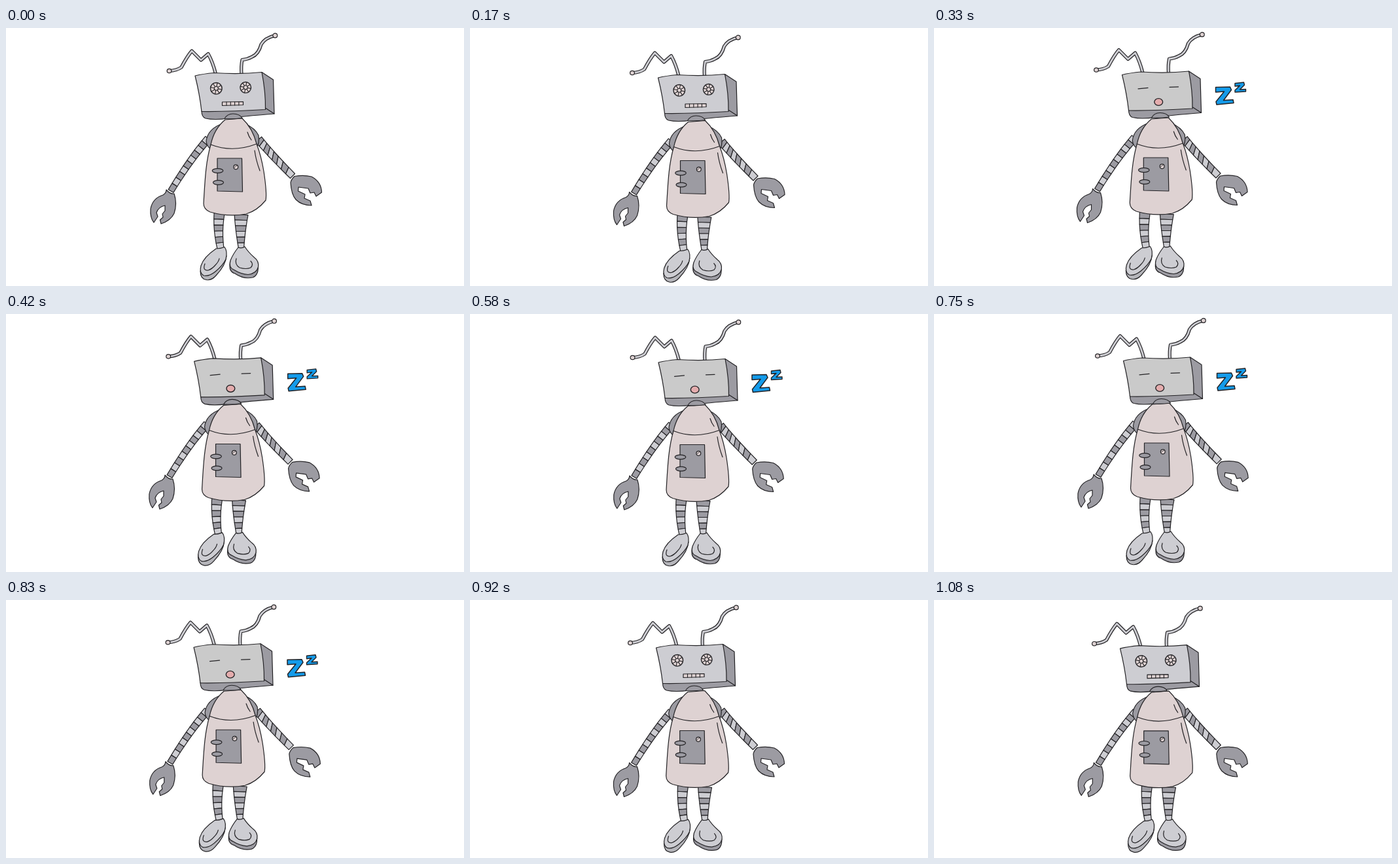
These frames come from a looping animation (700 px wide and 394 px high, 1.16 s). An HTML page with a canvas:

```html
<!DOCTYPE html>
<html lang="en">
<head>
<meta charset="utf-8">
<title>Sleepy robot</title>
<style>
html, body { margin: 0; height: 100%; overflow: hidden; background: #fff; }
canvas { display: block; }
</style>
</head>
<body>
<canvas id="stage" width="700" height="394"></canvas>
<script>
const ctx = document.getElementById('stage').getContext('2d');
const INK = '#242326', DARK = '#9c9ba2', LIGHT = '#cdcdd2', PINK = '#ded2d2', BLUE = '#149bea';
const LOOP = 1160, STEPS = 14;
// Twelve drawings per second, timed to hundredths of a second.
const starts = Array.from({ length: STEPS }, (_, i) => Math.round(i * 25 / 3) * 10);

// Drift of each part at the key steps, as [x, y].
const keys = [0, 2, 4, 7, 9, 11, 13, 14];
const drift = {
  head: [[0, 0], [-1.5, 3], [-1.5, -1.5], [-1, 1], [.5, -1.5], [-4.5, 0], [-4.5, 1.2], [0, 0]],
  body: [[0, 0], [-1.5, 3.5], [-2.7, -1], [-2, .5], [-1.5, -2], [-2.3, .5], [-2.3, .8], [0, 0]],
  left: [[0, 0], [-1.5, 3.5], [-2.5, -1.5], [-1.2, 0], [-1, -2], [-1.5, 1.5], [-.7, 1.5], [0, 0]],
  right: [[0, 0], [-1.5, 3.5], [-3.5, -.5], [-3.3, .5], [-2.3, -.7], [-2, -1], [-3.2, -1], [0, 0]],
  legs: [[0, 0], [-1.2, 3.5], [-3.7, -1], [-3, 0], [-3, -2], [-.5, .7], [-.5, .7], [0, 0]]
};

function offset(part, step) {
  const k = keys.findLastIndex(v => v <= step);
  const f = (step - keys[k]) / (keys[k + 1] - keys[k]);
  const [a, b] = [drift[part][k], drift[part][k + 1]];
  return a.map((v, i) => v + (b[i] - v) * f);
}

function shape(d, fill, width = 1.2) {
  const path = new Path2D(d);
  if (fill) { ctx.fillStyle = fill; ctx.fill(path); }
  ctx.strokeStyle = INK;
  ctx.lineWidth = width;
  ctx.stroke(path);
}

const line = (d, width) => shape(d, null, width);

function oval(x, y, rx, ry, fill, width = 1.2) {
  const p = new Path2D();
  p.ellipse(x, y, rx, ry, 0, 0, 7);
  shape(p, fill, width);
}

function tube(d) {
  const path = new Path2D(d);
  for (const [color, width] of [[INK, 5.2], [LIGHT, 2.8]]) {
    ctx.strokeStyle = color;
    ctx.lineWidth = width;
    ctx.stroke(path);
  }
}

// Striped limb along a quadratic curve; skew slants the stripes.
function limb([x0, y0, cx, cy, x1, y1], w0, w1, count, skew, first = 0) {
  const edge = (t, side) => {
    const u = t + side * skew * t * (1 - t) * 4;
    const mix = (a, c, b) => a * (1 - u) ** 2 + 2 * c * u * (1 - u) + b * u * u;
    const slope = (a, c, b) => (c - a) * (1 - u) + (b - c) * u;
    const dx = slope(x0, cx, x1), dy = slope(y0, cy, y1);
    const r = side * (w0 + (w1 - w0) * u) / 2 / Math.hypot(dx, dy);
    return [mix(x0, cx, x1) - dy * r, mix(y0, cy, y1) + dx * r];
  };
  for (let i = 0; i < count; i++) {
    const a = i / count, b = (i + 1) / count;
    const corners = [edge(a, -1), edge(b, -1), edge(b, 1), edge(a, 1)];
    shape('M' + corners.join('L') + 'Z', (i + first) % 2 ? DARK : LIGHT);
  }
}

function legs() {
  limb([326, 283, 323, 310, 328, 337], 16, 10, 6, 0, 1);
  limb([359.5, 285, 358, 310, 359.5, 337], 21, 8, 6, 0, 1);
  shape('M297 371Q297 383 306 384.5Q314 386 321 378Q336 362 337 348L322 352Z', '#b5b5ba');
  shape('M321 337Q328 337 334 334.5Q339 341 336 353Q332 362 320 372Q310 380 302 378Q295 374 298 363Q302 350 321 337Z', LIGHT);
  line('M304 360Q300 371 309 370Q315 368 320 362Q325 357 326 352');
  shape('M342.5 359Q340 372 350 375Q363 384 377 381Q387 377 385 361Z', DARK);
  shape('M355 335Q360 337 365 334Q370 342 379 350Q387 356 385.5 365Q383 375 370 376.5Q359 376 348 369Q340 366 343 355Q347 345 355 335Z', LIGHT);
  line('M352 352Q349 361 357 366Q367 369 374 366Q379 361 374 356');
}

function leftArm() {
  limb([309, 169, 281, 201, 252, 249], 11, 9, 10, 0);
  shape('M245 247Q251 254 257 253Q262 268 257 283Q252 294 237 299L235.500 293L240 289L239 284L243 279L243 271Q233 273 230 282L232 288L226 297Q220 290 221 276Q224 260 240 255Q245 252 245 247Z', DARK);
}

function rightArm() {
  limb([386, 170, 404, 192, 438, 226], 12, 10, 8, .05, 1);
  shape('M435 236Q436 231 441 226.500Q455 224 467 227Q482 235 482.500 251L474 257L471 251L465 252L462 245L447 243L446.500 249L457 254L456 260L465 264L467 271Q452 271 443 262Q436 254 435 236Z', DARK);
}

function body() {
  shape('M331 146Q308 154 306 173Q307 181 313 185L326 165Z', DARK);
  shape('M365 146Q381 153 386 164Q388 177 382 184L368 165Z', DARK);
  shape('M335 140Q318 154 313 178C305 205 304 235 302 268Q302 277 312 281Q340 289 367 284Q384 279 397 263Q399 252 394 219Q390 195 383 177Q377 153 361 138Z', PINK);
  line('M313 178Q346 191 383 177');
  line('M369 159Q371 166 375 171');
  line('M380 187Q382 202 388 218');
  shape('M323 199L360.500 199L361.500 250L323 249Z', DARK);
  oval(351.3, 212.3, 3.4, 3.5, PINK);
  line('M349 213L353 210', .8);
  oval(323.5, 218, 8.3, 3.3, DARK);
  oval(324.5, 236, 8, 3.3, DARK);
}

function eye(x, y, r) {
  oval(x, y, r, r, PINK, 1.4);
  for (let i = 0; i < 8; i++) {
    const a = i * Math.PI / 4 + .2, c = Math.cos(a), s = Math.sin(a);
    line(`M${x + c * 3} ${y + s * 3}L${x + c * r} ${y + s * r}`, 1.1);
  }
  oval(x, y, 3, 3, PINK, 1.1);
}

function awakeFace() {
  eye(321.3, 92.3, 8.8);
  eye(366.2, 90.8, 8.3);
  shape('M330.500 113L362.500 112.500L362.500 117.500L330.500 118.500Z', PINK);
  for (let x = 337; x < 362; x += 6.3) line(`M${x} 113L${x} 118`, 1.1);
}

function asleepFace() {
  line('M313.500 94.300L328.500 92.800');
  line('M361.500 91.800L375 91.300');
  oval(344.7, 114.5, 6.4, 5.4, '#e4acad', 1.4);
  shape('M432 92L454 91.500L456 96L444 112L458.500 111L459.500 116L433.500 118.500L432.500 114L445 98.500L432 99.500Z', BLUE, 1.5);
  shape('M461.500 86L475 84.500L476 88.500L469 95.500L478 95L478 98.500L461.500 99.500L461.500 96.500L469 89.500L461.500 90.500Z', BLUE, 1.4);
}

function head(asleep) {
  tube('M249 65.500Q261 65 268 60Q277 43 284 35L298 49L309 39.500Q316 52 320.500 70');
  tube('M411 11.500Q396 15 390 25Q386 40 376 44Q369 48 361 48.500Q359 58 360 71');
  oval(249.5, 65.5, 3.4, 3.2, PINK);
  oval(411.3, 11.5, 3.4, 3.4, PINK);
  shape('M391 67.500L408.500 79L410 131L396 123Z', DARK);
  shape('M299 126.500L397 122.500L410 131Q360 135 340 138Q318 141 305 138Q299 136 299 126.500Z', DARK);
  shape('M289 73Q301 70 318 68.500Q358 71 391 67.500Q397 98 396.500 124.500Q340 128 299 127.500Q296 101 289 73Z', asleep ? '#cacaca' : LIGHT);
  shape('M334 138.500Q338 131 347 131Q357 131 361 137.500Q347 139.500 334 138.500Z', DARK);
  (asleep ? asleepFace : awakeFace)();
}

function frame() {
  const t = performance.now() % LOOP;
  const step = starts.findLastIndex(s => s <= t);
  const asleep = step >= 4 && step < 11;
  const place = (part, draw) => {
    ctx.save();
    ctx.translate(...offset(part, step));
    draw(asleep);
    ctx.restore();
  };
  ctx.clearRect(0, 0, 700, 394);
  ctx.lineJoin = ctx.lineCap = 'round';
  place('legs', legs);
  place('left', leftArm);
  place('right', rightArm);
  place('body', body);
  place('head', head);
  requestAnimationFrame(frame);
}
frame();
</script>
</body>
</html>
```
